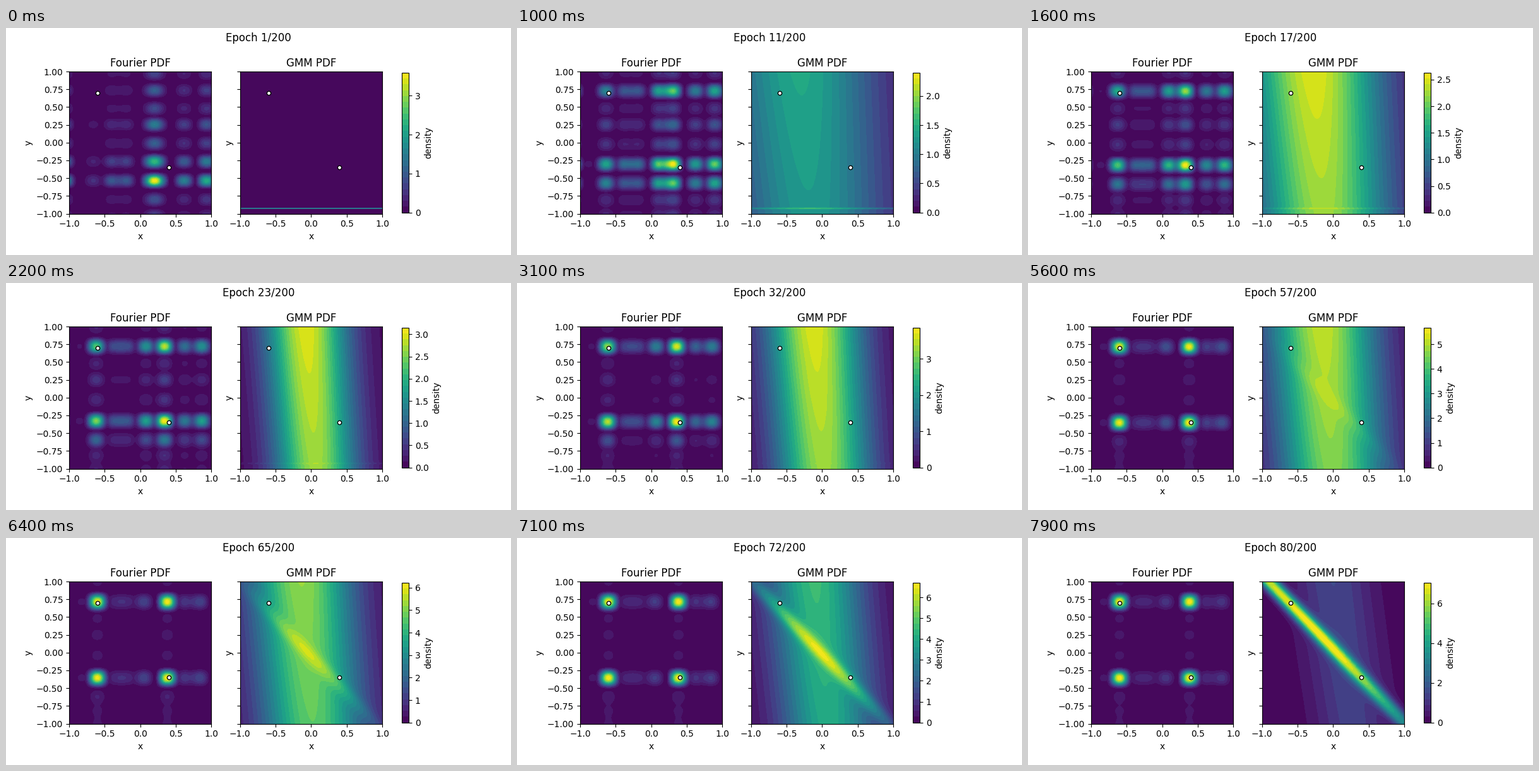
Recreate the animation shown at these times as a matplotlib script. Size 800 by 360 pixels, loop 8000 ms.

```python
import numpy as np
import matplotlib.pyplot as plt
from matplotlib.animation import FuncAnimation
from matplotlib.ticker import AutoLocator

FRAMES, STEP = 80, 100
BANDS = 24

grid = np.linspace(-1, 1, 161)
X, Y = np.meshgrid(grid, grid)

# Lobes as (start, end, first height): data lobes grow, ripples fade
X_DATA = [(-0.66, -0.60, 0.22), (0.25, 0.385, 1.0)]
X_RIPPLES = [(-0.92, -0.82, 0.05), (-0.40, -0.34, 0.45), (-0.20, -0.18, 0.45),
             (0.15, 0.045, 1.0), (0.615, 0.63, 0.7), (0.93, 0.83, 1.0)]
Y_DATA = [(-0.265, -0.358, 0.67), (0.735, 0.715, 0.3)]
Y_RIPPLES = [(-0.80, -0.82, 0.25), (-0.535, -0.625, 1.0), (-0.01, -0.04, 0.3),
             (0.255, 0.25, 0.42), (0.48, 0.48, 0.22), (0.97, 1.0, 0.2)]


def ease(a, b, n, tau):
    """Exponential approach from a (first epoch) to b."""
    return b + (a - b) * np.exp(-(n - 1) / tau)


def bell(d, s):
    return np.exp(-0.5 * (d / s) ** 2)


def lobes(group, n, goal, tau, half):
    total = np.zeros_like(grid)
    for start, end, height in group:
        center = ease(start, end, n, 20)
        d = np.abs((grid - center + 1) % 2 - 1)
        shape = np.cos(np.pi / 2 * np.minimum(d / half, 1)) ** 2
        total += ease(height, goal, n, tau) * shape
    return total


def marginal(data, ripples, n, fade, half):
    total = lobes(data, n, 1, 16, half) + lobes(ripples, n, 0.05, fade, half)
    return total / total.max()


def fourier(n):
    fx = marginal(X_DATA, X_RIPPLES, n, 35, 0.18)
    fy = marginal(Y_DATA, Y_RIPPLES, n, 20, ease(0.135, 0.165, n, 20))
    return np.outer(fy, fx)


def mixture(n):
    # the diagonal ridge takes over from the upright column
    t = np.exp((n - FRAMES) / 8)
    keys = [1, 17, 23, 42]
    mid = np.interp(n, keys, [-0.3, -0.2, 0, -0.09]) + 0.23 * t
    width = np.interp(n, keys, [0.9, 0.66, 0.41, 0.54]) - 0.17 * t
    rise = min(1, (n - 1) / 16)
    height = rise * (1 - 0.78 * t) * (0.9 + 0.05 * Y)
    column = height * bell(X - mid + (0.07 + 0.07 * t) * Y, width)

    offset = Y + 1.04 * X + 0.066 - 0.125 * t
    ridge = 0.92 * t * bell(offset, 0.095) * bell(X - 0.2 + 0.8 * t, 0.6 + 0.7 * t)
    line = ease(0.6, 0, n, 7) * bell(Y + 0.925, 0.004)
    return column + ridge + line


def top_density(n):
    return np.interp(n, [1, 11, 17, 23, 42, 72, 80],
                     [3.59, 2.4, 2.63, 3.15, 4.64, 6.7, 7.05])


fig, axes = plt.subplots(1, 2, figsize=(8, 3.6), dpi=100, sharey=True)
fig.subplots_adjust(left=0.125, right=0.745, bottom=0.11, top=0.88, wspace=0.2)
heading = fig.suptitle("")
for ax, name in zip(axes, ("Fourier PDF", "GMM PDF")):
    ax.set(title=name, xlabel="x", ylabel="y", xlim=(-1, 1), ylim=(-1, 1))
    ax.set_aspect("equal")
    ax.scatter([-0.6, 0.4], [0.7, -0.35], s=20, c="white", edgecolors="black",
               linewidths=1, zorder=3)

shown = []


def draw(i):
    n = i + 1
    for artist in shown:
        artist.remove()
    shown.clear()
    top = top_density(n)
    levels = np.linspace(0, top, BANDS + 1)
    for ax, field in zip(axes, (fourier, mixture)):
        z = np.clip(field(n) * top, 0, top)
        fill = ax.contourf(X, Y, z, levels=levels, cmap="viridis")
        shown.append(fill)
    cax = fig.add_axes([0.78375, 0.187, 0.01386, 0.616])
    fig.colorbar(fill, cax=cax, label="density", ticks=AutoLocator())
    shown.append(cax)
    heading.set_text(f"Epoch {n}/200")
    return shown


anim = FuncAnimation(fig, draw, frames=FRAMES, interval=STEP, repeat=True,
                     repeat_delay=0, blit=False)
plt.show()
```
